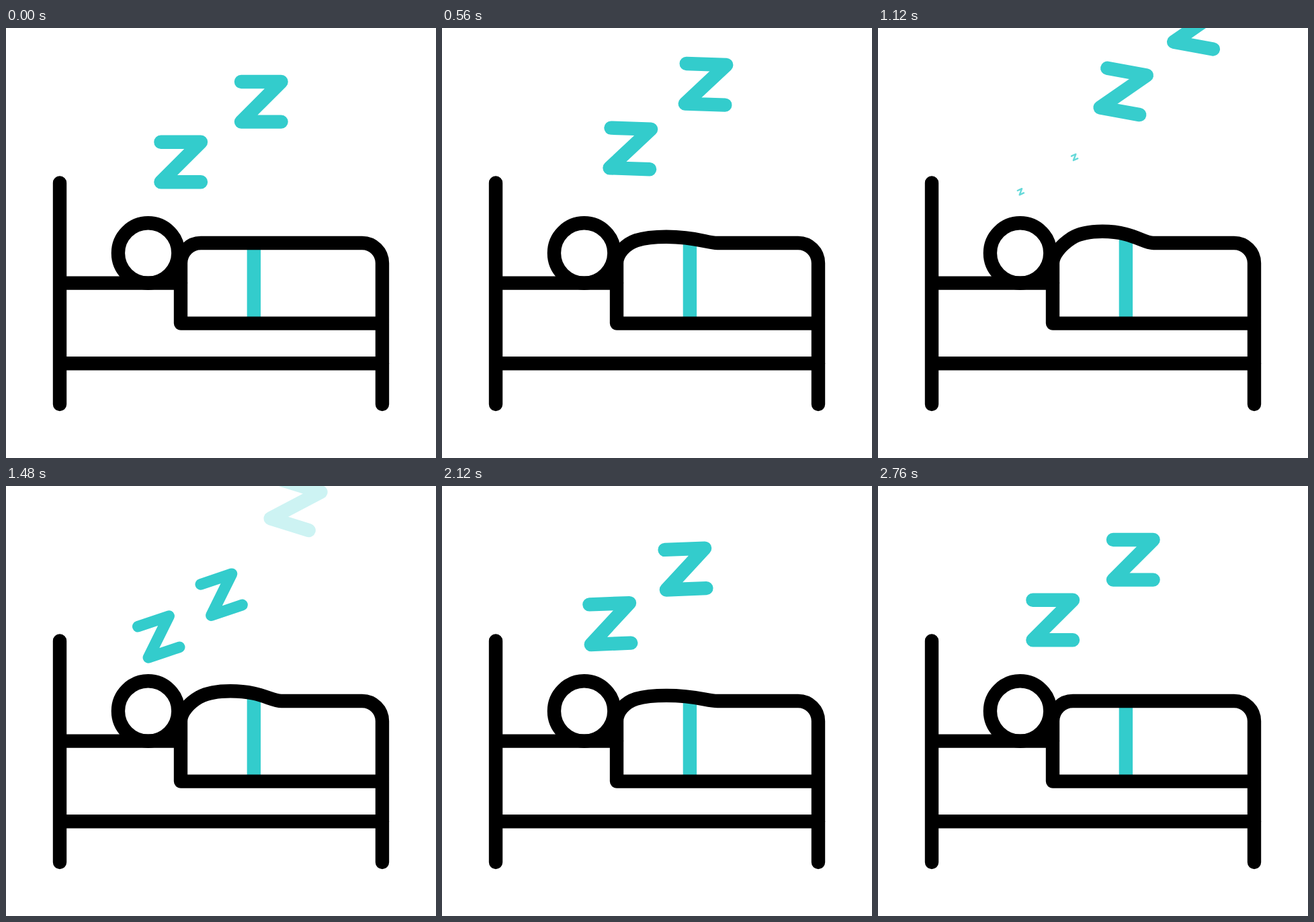
An HTML page that plays this animation: 640 px wide and 640 px high, repeating every 3000 ms.

```html
<!DOCTYPE html>
<html lang="en">
<head>
<meta charset="utf-8">
<title>Sleeping</title>
<style>
html, body { margin: 0; width: 100%; height: 100%; overflow: hidden; background: #fff; }
svg { display: block; width: 100vw; height: 100vh; }
path, circle { fill: none; stroke: #000; stroke-width: 20.4; stroke-linecap: round; stroke-linejoin: round; }
.teal { stroke: #33cccc; }
</style>
</head>
<body>
<svg viewBox="0 0 640 640">
  <path id="stripe" class="teal" style="stroke-linecap:butt"/>
  <path d="M80 230.5V560M80 379.6H260M80 499.3H560"/>
  <circle cx="211.6" cy="335" r="44.7"/>
  <path id="blanket"/>
  <g id="zs"></g>
</svg>
<script>
const LOOP = 3000, STEP = 40;
const LOW = [260.2, 199.5], HIGH = [379.8, 109.8];
const $ = id => document.getElementById(id);
const clamp = x => Math.min(1, Math.max(0, x));
const ramp = (t, a, b) => clamp((t - a) / (b - a));
const smooth = x => x * x * (3 - 2 * x);

function makeZ() {
  const z = document.createElementNS("http://www.w3.org/2000/svg", "path");
  z.setAttribute("class", "teal");
  z.setAttribute("d", "M-29.8-29.8H29.8L-29.8 29.8H29.8");
  $("zs").appendChild(z);
  return z;
}
const [outLow, outHigh, inLow, inHigh] = Array.from({ length: 4 }, makeZ);

function place(z, x, y, turn, scale, alpha) {
  z.setAttribute("transform", `translate(${x} ${y}) rotate(${turn}) scale(${scale})`);
  z.setAttribute("opacity", alpha);
}

// The resting pair drifts up to the right, tilts and fades.
function leave(t) {
  const s = Math.max(0, t - 200);
  const d = s * s * (1.747e-4 - 5.5e-8 * s);
  const turn = d * (0.093 + 0.00005 * d);
  const alpha = 1 - ramp(t, 1110, 1600);
  const bend = 1 - Math.exp(-d / 15);
  place(outLow, LOW[0] + d, LOW[1] - d, turn, 1, alpha);
  place(outHigh, HIGH[0] + d - 10 * bend, HIGH[1] - d - 8 * bend, turn, 1, alpha);
}

// A new pair grows near the head and settles into the resting places.
function arrive(t) {
  const v = Math.max(0, 2760 - t);
  const r = Math.min(1.05, v * v * (4.85e-7 - 7e-11 * v));
  const arc = r * (1 - r);
  const turn = -24.7 * (1 - smooth(ramp(t, 1060, 2360)));
  const scale = ramp(t, 1060, 1573);
  const alpha = ramp(t, 1060, 1140);
  place(inLow, LOW[0] - 48 * (r + 0.17 * arc), LOW[1] + 44.5 * (r - 0.38 * arc), turn, scale, alpha);
  place(inHigh, HIGH[0] - 87.5 * (r + 0.12 * arc), HIGH[1] + 83 * (r - 0.1 * arc), turn, scale, alpha);
}

function breathe(t) {
  const k = smooth(ramp(t, 130, 950)) * (1 - Math.pow(ramp(t, 1120, 2760), 1.3));
  const top = 320 - 17.2 * k;
  $("blanket").setAttribute("d",
    `M560 439.6H260V350C260 ${333.4 + 4.6 * k} ${273.4 - 1.4 * k} ${320 + 3.5 * k} ${290 - 2 * k} ${320 - 7 * k}` +
    `C${303 - 3 * k} ${320 - 14.5 * k} 318 ${top} 334 ${top}` +
    `C379 ${top} 394 320 410 320H530Q530 320 530 320A30 30 0 0 1 560 350V560`);
  $("stripe").setAttribute("d", `M368.9 ${321 - 12 * k}V440`);
}

function draw(now) {
  const t = Math.floor((now % LOOP) / STEP) * STEP;
  leave(t);
  arrive(t);
  breathe(t);
}

function tick() {
  draw(performance.now());
  requestAnimationFrame(tick);
}
tick();
</script>
</body>
</html>
```
